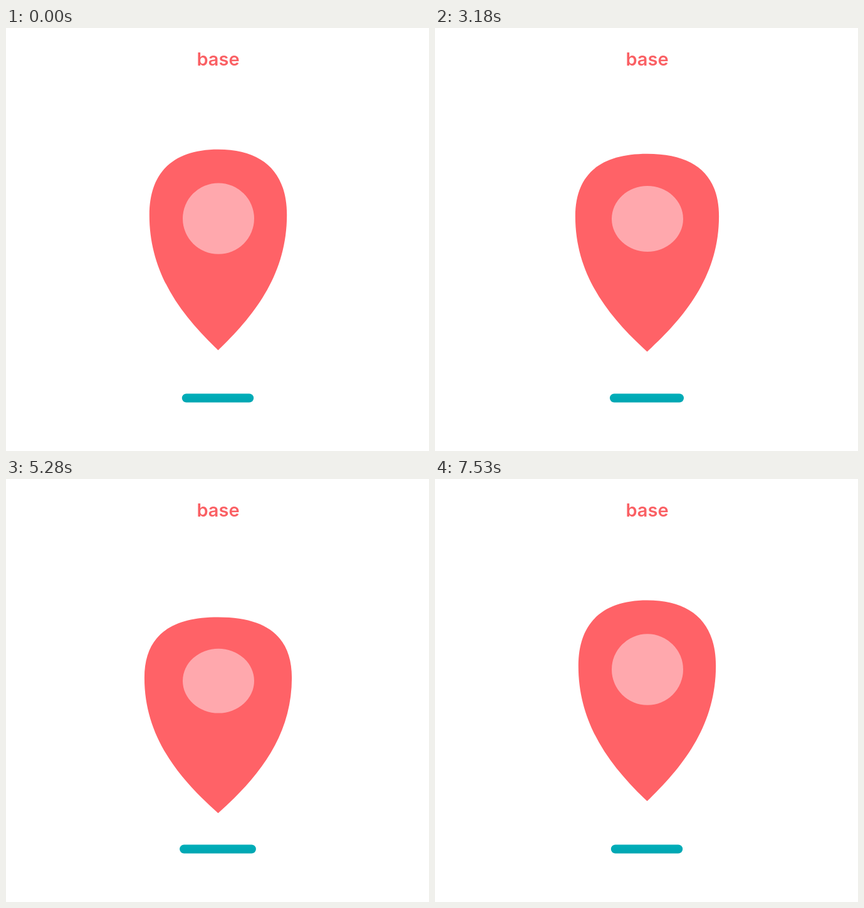
Animation, 675 px wide and 675 px high, one loop 7.56 s. Source, as an HTML page:

```html
<!DOCTYPE html>
<html lang="en">
<head>
<meta charset="utf-8">
<title>Bouncing pin</title>
<style>
  html, body { margin: 0; width: 100%; height: 100%; overflow: hidden; background: #fff; }
  svg { display: block; width: 100vw; height: 100vh; }
  text { font: 600 29px Inter, "Open Sans", sans-serif; fill: #fa6064; text-anchor: middle; }
</style>
</head>
<body>
<svg viewBox="0 0 675 675">
  <defs>
    <linearGradient id="teal" x2="0" y2="1">
      <stop stop-color="#00aeb9"/>
      <stop offset="1" stop-color="#00a6b2"/>
    </linearGradient>
  </defs>
  <text x="338.5" y="60">base</text>
  <path id="pin" fill="#ff6267"/>
  <ellipse id="hole" cx="339" rx="57" fill="#ffa8ad"/>
  <rect id="bar" y="583.5" height="14" rx="7" fill="url(#teal)"/>
</svg>
<script>
const LOOP = 7560, CYCLE = 2040, START = 150, HOLD = 120;
const CX = 338.5;
const pin = document.getElementById('pin');
const hole = document.getElementById('hole');
const bar = document.getElementById('bar');

const clamp = u => Math.min(1, Math.max(0, u));
const inOut = u => u < .5 ? 4 * u ** 3 : 1 - 4 * (1 - u) ** 3;

// Accelerating move: the middle of the ease comes late.
const sink = (p, from, to, warp) => inOut(clamp((p - from) / (to - from)) ** warp);
// The mirror of it: quick start, slow finish.
const lift = (p, from, to, warp) => 1 - sink(-p, -to, -from, warp);

// One value through crouch, jump, fall and recovery.
function track(p, rest, low, high, crouchWarp, fallWarp) {
  if (p < 380) return rest + (low - rest) * sink(p, -10, 380, crouchWarp);
  if (p < 800) return low + (high - low) * lift(p, 380, 660, 1.5);
  if (p < 1080) return high + (low - high) * sink(p, 800, 1080, fallWarp);
  return low + (rest - low) * lift(p, 1080, 1350, 1.3);
}

function pinPath(tip, squash) {
  const w = 109.25 + 8.5 * squash;
  const top = tip - 321 + 8.5 * squash;
  const side = tip - 216;
  const round = w * (.65 + .04 * squash);
  const rise = (side - top) * .65;
  const half = d => `C${CX + d * round} ${top} ${CX + d * w} ${side - rise} ${CX + d * w} ${side}` +
    `C${CX + d * w} ${side + 94} ${CX + d * w * .535} ${tip - 56} ${CX} ${tip}`;
  return `M${CX} ${top}${half(1)}M${CX} ${top}${half(-1)}Z`;
}

function draw(t) {
  // The opening hold keeps the last pose of the recovery.
  const phase = t < HOLD ? 1260 : (t - START + CYCLE) % CYCLE;
  const p = phase > CYCLE - 30 ? phase - CYCLE : phase;

  const tip = track(p, 513, 534, 491, 1.95, 1.645);
  const squash = track(p, 0, 1, 0, 2.2, 1.57);
  pin.setAttribute('d', pinPath(tip, squash));

  hole.setAttribute('cy', track(p, 303, 323, 279, 1.65, 1.67));
  hole.setAttribute('ry', track(p, 57, 51.4, 57, 1.7, 1.18));

  const width = track(p, 114, 122, 114, 1.68, 1.79);
  bar.setAttribute('x', 338 - width / 2);
  bar.setAttribute('width', width);
}

function tick() {
  draw(performance.now() % LOOP);
  requestAnimationFrame(tick);
}
tick();
</script>
</body>
</html>
```
